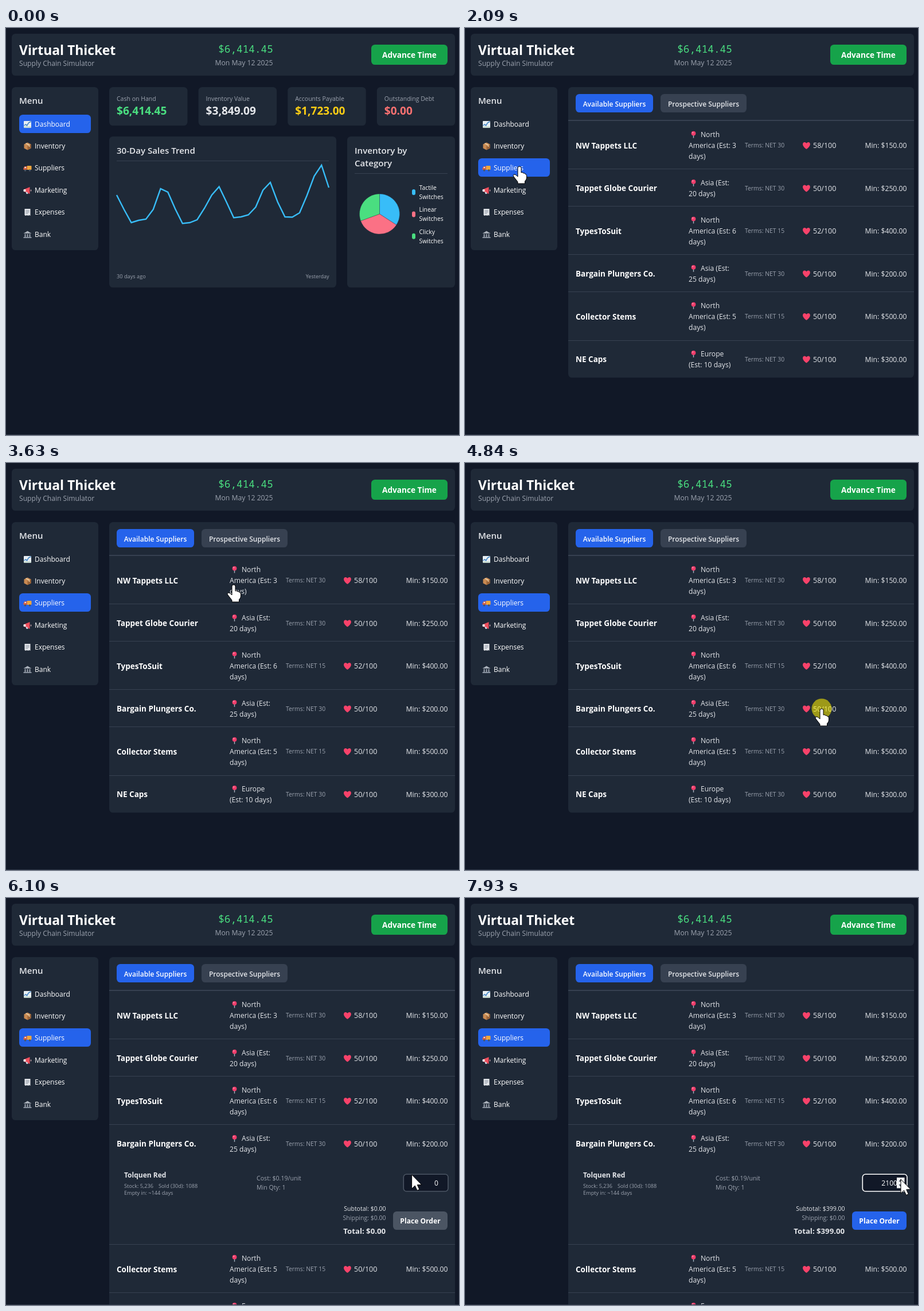
Animation, 790 px wide and 709 px high, one loop 8000 ms. Source, as an HTML page:

```html
<!DOCTYPE html>
<html lang="en">
<head>
<meta charset="utf-8">
<title>Supply Chain Simulator</title>
<style>
  html, body { margin: 0; width: 100%; height: 100%; overflow: hidden; background: #111827; }
  svg { display: block; }
  #stage { width: 100%; height: 100%; }
  text { font-family: "Open Sans", "Noto Sans", sans-serif; white-space: pre; }
  .mono { font-family: "Noto Sans Mono", "DejaVu Sans Mono", monospace; }
</style>
</head>
<body>
<svg id="stage" viewBox="0 0 790 709" xmlns="http://www.w3.org/2000/svg"></svg>
<script>
const LOOP = 8000;
const C = {
  bg: '#111827', panel: '#1f2937', line: '#374151', muted: '#9ca3af', light: '#e5e7eb', white: '#fff',
  blue: '#2563eb', button: '#4b5563', green: '#4ade80', sky: '#38bdf8', rose: '#fb7185', red: '#f87171',
  yellow: '#facc15'
};

// Markup helpers
const text = (x, y, size, str, fill = C.white, weight = 400, anchor = 'start', extra = '') =>
  `<text x="${x}" y="${y}" font-size="${size}" fill="${fill}" font-weight="${weight}" text-anchor="${anchor}" ${extra}>${str}</text>`;
const box = (x, y, w, h, fill, r = 0, extra = '') =>
  `<rect x="${x}" y="${y}" width="${w}" height="${h}" rx="${r}" fill="${fill}" ${extra}/>`;
const group = (id, body) => `<g id="${id}">${body}</g>`;
const at = (x, y, body) => `<g transform="translate(${x} ${y})">${body}</g>`;

const icons = {
  chart: box(-6.5, -6, 13, 12, '#e8eef2', 1) +
    '<path d="M-6 2L-3 0-1 2 2-3 6-5" fill="none" stroke="#3b82c4" stroke-width="1.5"/><path d="M-6 4.5H6" stroke="#9fc6a5"/>',
  crate: '<path d="M0-6.5L6-3.5V3.5L0 6.5-6 3.5V-3.5Z" fill="#c98a52"/><path d="M0 0V6.5L6 3.5V-3.5Z" fill="#9a6236"/>' +
    '<path d="M-3-5L3-2V1" fill="none" stroke="#ecd0a8" stroke-width="1.5"/>',
  truck: box(-1, -4, 8, 7, '#f0a63c', 1) + '<path d="M-7 3V0L-5-3H-1V3Z" fill="#e0603f"/>' + box(-5, -2, 2.5, 2, '#cfe6f5') +
    '<circle cx="-4" cy="4" r="1.8" fill="#4b5563"/><circle cx="4" cy="4" r="1.8" fill="#4b5563"/>',
  horn: '<path d="M-6-2L4-6V6L-6 2Z" fill="#ef4d5c"/><path d="M-3 2L-2 6H1L0 3Z" fill="#cbd5e1"/>' +
    box(-7, -2, 4, 4, '#f4f4f5', 1) + '<path d="M5.5-2Q8 0 5.5 2Z" fill="#f9c9cf"/>',
  receipt: '<path d="M-5-6H5V6L3 5 1 6-1 5-3 6-5 5Z" fill="#e5e7eb"/><path d="M-3-3H3M-3-.5H3M-3 2H1" stroke="#7b8594"/>',
  bank: '<path d="M-7-2L0-6.5 7-2Z" fill="#a9b0ba"/>' + [-5, -1, 3].map(x => box(x, -1, 2, 5, '#9aa2ad')).join('') +
    box(-7, 4, 14, 2, '#858e9b'),
  pin: '<path d="M0 0V6" stroke="#aab4c0" stroke-width="1.4"/><circle cy="-2" r="3.9" fill="#f23d6b"/><circle cx="-1.2" cy="-3.3" r="1.1" fill="#fba4ba"/>',
  heart: '<path d="M0 6C-9 0-7-6-3.2-6-1.5-6-.4-5 0-4 .4-5 1.5-6 3.2-6 7-6 9 0 0 6Z" fill="#f8426a"/>'
};

const menu = [['Dashboard', 'chart'], ['Inventory', 'crate'], ['Suppliers', 'truck'],
  ['Marketing', 'horn'], ['Expenses', 'receipt'], ['Bank', 'bank']];
const menuY = i => Math.floor(151 + 38.4 * i);

function header() {
  return box(10, 10, 773, 73, C.panel, 6.4) +
    text(23, 47, 22.9, 'Virtual Thicket', C.white, 700) +
    text(23, 66, 12.1, 'Supply Chain Simulator', C.muted) +
    text(418, 43, 17.7, '$6,414.45', C.green, 400, 'middle', 'class="mono"') +
    text(415, 65, 12.2, 'Mon May 12 2025', C.muted, 400, 'middle') +
    box(637, 29, 133, 35, '#16a34a', 6.4) +
    text(703.5, 52, 13.6, 'Advance Time', C.white, 700, 'middle');
}

function sidebar() {
  return box(10, 103, 151, 284, C.panel, 6.4) + text(23, 132, 15, 'Menu', C.light, 600) +
    menu.map(([label, icon], i) => box(23, menuY(i), 125, 32, C.blue, 6.4, `id="nav${i}"`) +
      at(37.5, menuY(i) + 17, icons[icon]) + text(50, menuY(i) + 21, 12, label)).join('');
}

function pie(cx, cy, r) {
  const point = a => {
    const rad = a * Math.PI / 180;
    return `${cx + r * Math.sin(rad)} ${cy - r * Math.cos(rad)}`;
  };
  return [[0, 123, C.sky], [123, 250, C.rose], [250, 360, C.green]].map(([a, b, fill]) =>
    `<path d="M${cx} ${cy}L${point(a)}A${r} ${r} 0 0 1 ${point(b)}Z" fill="${fill}" stroke="${C.panel}" stroke-width=".3"/>`).join('');
}

function dashboard() {
  const cards = [['Cash on Hand', '$6,414.45', C.green], ['Inventory Value', '$3,849.09', C.light],
    ['Accounts Payable', '$1,723.00', C.yellow], ['Outstanding Debt', '$0.00', C.red]];
  const sales = [291, 316, 339, 335, 333, 316, 280, 286, 315, 340.5, 339, 334, 314, 291, 276.5,
    303, 330.5, 329, 325.5, 312, 282.5, 269, 303, 329, 329.5, 322, 292, 258, 239, 278];
  const points = sales.map((y, i) => `${193 + i * 370 / 29},${y}`).join(' ');
  const legend = [['Tactile', C.sky], ['Linear', C.rose], ['Clicky', C.green]];
  return cards.map(([label, value, fill], i) => {
    const x = 180 + 155.6 * i;
    return box(x, 103, 136.5, 67, C.panel, 6.4) + text(x + 13, 127, 10.5, label, C.muted) +
      text(x + 13, 151.3, 19.1, value, fill, 700);
  }).join('') +
    box(180, 189, 396, 263, C.panel, 6.4) + text(193, 219, 15.1, '30-Day Sales Trend', C.light, 600) +
    box(193, 231, 370, 1, C.line) +
    `<polyline points="${points}" fill="none" stroke="${C.sky}" stroke-width="2.4"/>` +
    text(193, 436, 9.2, '30 days ago', C.muted) + text(563.5, 436, 9, 'Yesterday', C.muted, 400, 'end') +
    box(595, 189, 188, 263, C.panel, 6.4) + text(608, 219, 15.1, 'Inventory by', C.light, 600) +
    text(608, 241, 15.1, 'Category', C.light, 600) + box(608, 253, 162, 1, C.line) +
    pie(651.5, 324, 35) +
    legend.map(([label, fill], i) => {
      const y = 286 + 38.4 * i;
      return box(708, y - 5, 6, 10, fill, 3) + text(720.5, y - 4, 10.4, label) + text(720.5, y + 12, 10.4, 'Switches');
    }).join('');
}

const suppliers = [
  [162, 205, 'NW Tappets LLC', ['North', 'America (Est: 3', 'days)'], 30, 58, 150],
  [246, 279.5, 'Tappet Globe Courier', ['Asia (Est:', '20 days)'], 30, 50, 250],
  [311, 354, 'TypesToSuit', ['North', 'America (Est: 6', 'days)'], 15, 52, 400],
  [395, 428.5, 'Bargain Plungers Co.', ['Asia (Est:', '25 days)'], 30, 50, 200],
  [460, 503, 'Collector Stems', ['North', 'America (Est: 5', 'days)'], 15, 50, 500],
  [545, 577.5, 'NE Caps', ['Europe', '(Est: 10 days)'], 30, 50, 300]
];

function supplierRow([top, mid, name, place, net, score, min], i) {
  const first = mid + 4 - 9.7 * (place.length - 1);
  return group('row' + i, (i ? box(180, top - 1, 603, 1, C.line) : '') +
    text(193, mid + 4.7, 13.5, name, C.white, 700) +
    at(398.5, first - 4, icons.pin) +
    place.map((s, n) => text(n ? 390 : 411, first + 19.3 * n, 12.1, s, C.light)).join('') +
    text(488, mid + 3, 10.4, 'Terms: NET ' + net, C.muted) +
    at(595.5, mid, icons.heart) + text(607, mid + 4.2, 12.5, score + '/100', C.light) +
    text(770.5, mid + 4.2, 12.2, `Min: $${min}.00`, C.light, 400, 'end'));
}

function orderPane() {
  const product = text(206, 487, 12, 'Tolquen Red', C.light, 700) +
    text(206, 505, 9.2, 'Stock: 5,236', C.muted) + text(266, 505, 9.2, 'Sold (30d): 1088', C.muted) +
    text(206, 517, 9.2, 'Empty in: ~144 days', C.muted) +
    text(437, 492, 10.6, 'Cost: $0.19/unit', C.muted) + text(437, 508, 10.6, 'Min Qty: 1', C.muted) +
    box(693.3, 481.3, 77.7, 29.7, C.bg, 5, 'id="field" stroke-width="1.6"') +
    text(754, 501.3, 12.1, '0', C.white, 400, 'end', 'id="qty"') +
    group('spin', box(753, 487, 13.5, 18.5, '#f3f4f6') +
      '<path d="M756.5 494L759.7 490 763 494ZM756.5 499L759.7 503 763 499Z" fill="#374151"/>');
  const totals = text(662.5, 497, 10.5, '', C.light, 400, 'end', 'id="subtotal"') +
    text(662.5, 513, 10.5, 'Shipping: $0.00', C.muted, 400, 'end') +
    text(662, 536.5, 13.2, '', C.light, 700, 'end', 'id="total"') +
    text(662.5, 553, 9.1, 'Below Minimum Order', C.red, 400, 'end', 'id="warn"') +
    group('order', box(675, 498, 95, 32, C.button, 6.4, 'id="orderBox"') +
      text(722.5, 518.5, 12.1, 'Place Order', C.white, 700, 'middle'));
  return '<svg id="pane" x="180" y="460" width="603" height="0" overflow="hidden"><g transform="translate(-180 -460)">' +
    group('product', product) + group('totals', totals) + '</g></svg>';
}

function supplierView() {
  return box(180, 103, 603, 506, C.panel, 6.4, 'id="list"') +
    box(193, 115, 135, 32, C.blue, 6.4) + text(260.5, 136.8, 12, 'Available Suppliers', C.white, 600, 'middle') +
    box(341, 115, 150, 32, C.line, 6.4) + text(416, 136.8, 12, 'Prospective Suppliers', C.light, 600, 'middle') +
    box(180, 160, 603, 2, C.line) +
    orderPane() + suppliers.map(supplierRow).join('');
}

const outline = 'fill="#fff" stroke="#000" stroke-width="1" stroke-linejoin="round"';
const pointer =
  '<circle id="ring" r="17.5" fill="#fff000" opacity=".56"/>' +
  `<path id="arrow" d="M0 0V24.5L5.6 19.3 9.4 27.5 13.3 25.8 9.7 17.8H17.3Z" ${outline}/>` +
  `<path id="hand" d="M-3 3Q-3 0 0 0T3 3V11Q5 9.5 7 12 9.5 11 10 13.5 12.5 13.5 12.5 16V20Q12.5 23 9.5 26V30H-3V27L-10 18Q-12 14.5-9 14-6.5 14-3 18Z" ${outline}/>`;

document.getElementById('stage').innerHTML =
  box(0, 0, 790, 709, C.bg) + header() + sidebar() + group('dash', dashboard()) +
  group('supply', supplierView()) + box(0, 708, 790, 1, '#2d3748') + group('cursor', pointer);

const el = {};
document.querySelectorAll('[id]').forEach(node => el[node.id] = node);
const set = (id, name, value) => el[id].setAttribute(name, value);
// "inherit" lets hidden groups hide their children
const show = (id, on) => set(id, 'visibility', on ? 'inherit' : 'hidden');
const move = (id, x, y) => set(id, 'transform', `translate(${x} ${y})`);
const clamp = v => Math.max(0, Math.min(1, v));
const smooth = v => v * v * (3 - 2 * v);
const within = (t, a, b) => t >= a && t < b;

// Pointer stops: time, x, y
const path = [
  [250, 645, 621], [400, 601, 561], [560, 601, 561], [1350, 129, 224], [1420, 113, 221],
  [1480, 113, 221], [1690, 95, 241], [2470, 95, 241], [3030, 420, 273], [3320, 420, 273],
  [3630, 397, 212], [3930, 397, 212], [4500, 622, 428], [5660, 622, 428], [5710, 672, 444],
  [6000, 690, 477], [6340, 773, 500], [6640, 760, 490]
];

function pointerAt(t) {
  const i = path.findIndex(p => p[0] > t);
  if (i < 1) return path.at(i).slice(1);
  const [t0, x0, y0] = path[i - 1], [t1, x1, y1] = path[i];
  const k = smooth((t - t0) / (t1 - t0));
  return [x0 + (x1 - x0) * k, y0 + (y1 - y0) * k];
}

function quantity(t) {
  if (t < 6710) return 0;
  if (t < 6970) return 100;
  return Math.min(2100, 200 + 100 * Math.floor((t - 6970) / 50));
}

function render(t) {
  const listed = t >= 2090;
  show('dash', !listed);
  show('supply', listed);
  menu.forEach((_, i) => {
    const active = i === (listed ? 2 : 0);
    const hover = i === 2 && !listed ? clamp((t - 1520) / 150) : 0;
    set('nav' + i, 'fill', active ? C.blue : C.line);
    set('nav' + i, 'fill-opacity', active ? 1 : hover);
  });

  const qty = quantity(t), cost = (qty * 0.19).toFixed(2);
  const low = qty > 0 && cost < 200, stocked = t >= 5510;
  const open = 1 - (1 - clamp((t - 4850) / 580)) ** 2;
  const shift = 96 * open + (stocked ? 47.7 : 0) + (low ? 13 : 0);
  set('list', 'height', 506 + Math.floor(shift));
  set('pane', 'height', Math.floor(shift));
  // Rows sit on fractional tops and snap to whole pixels
  [459.5, 544.1].forEach((top, i) => move('row' + (i + 4), 0, Math.floor(top + shift) - Math.floor(top)));
  move('totals', 0, stocked ? 48 : 0);
  move('order', 0, low ? 6 : 0);
  show('product', stocked);
  show('warn', low);
  show('spin', stocked && t >= 6280);
  set('field', 'stroke', qty ? C.white : C.button);
  set('orderBox', 'fill', cost >= 200 ? C.blue : C.button);
  el.qty.textContent = qty;
  el.subtotal.textContent = 'Subtotal: $' + cost;
  el.total.textContent = 'Total: $' + cost;

  const hand = within(t, 1540, 5770);
  show('cursor', t >= 260 && !within(t, 5770, 6040));
  show('hand', hand);
  show('arrow', !hand);
  show('ring', within(t, 1960, 2090) || within(t, 4720, 4850) || within(t, 6710, 7930));
  move('cursor', ...pointerAt(t));
}

function tick(now) {
  render(now % LOOP);
  requestAnimationFrame(tick);
}
render(0);
requestAnimationFrame(tick);
</script>
</body>
</html>
```
